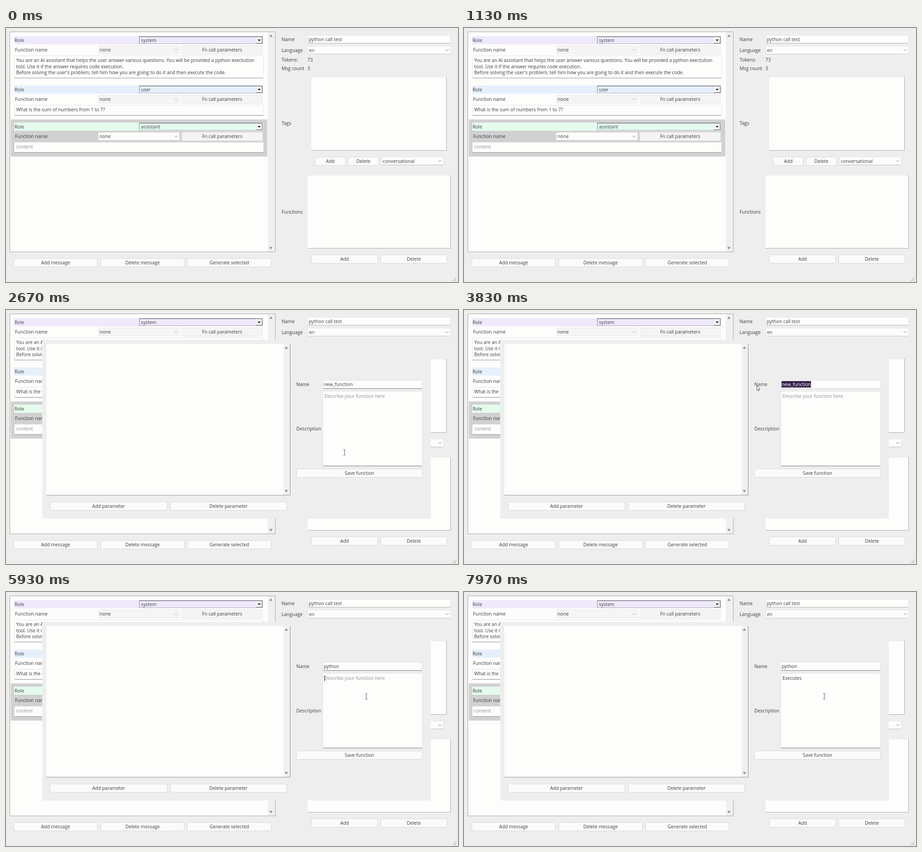
Write an HTML page with a canvas that moves like this. It is 998 px wide and 561 px high and loops after 8000 ms.

```html
<!DOCTYPE html>
<html lang="en">
<head>
<meta charset="utf-8">
<title>Function editor</title>
<style>
  html, body { margin: 0; width: 100%; height: 100%; overflow: hidden; background: #eeeeee; }
  canvas { display: block; }
</style>
</head>
<body>
<canvas id="stage" width="998" height="561"></canvas>
<script>
const ctx = document.getElementById('stage').getContext('2d');
const LOOP = 8000;
const FACE = '#eeeeee', PAPER = '#fdfdfc', INK = '#3c3c3c', HINT = '#8f8f8f';
const FONT = '10.32px "Open Sans", "Noto Sans", sans-serif';

function fill(x, y, w, h, color) {
  ctx.fillStyle = color;
  ctx.fillRect(x, y, w, h);
}

function rounded(x, y, w, h, color, border, radius = 2) {
  ctx.beginPath();
  ctx.roundRect(x + 0.5, y + 0.5, w - 1, h - 1, radius);
  ctx.fillStyle = color;
  ctx.fill();
  ctx.strokeStyle = border;
  ctx.lineWidth = 1;
  ctx.stroke();
}

function path(points, color, closed) {
  ctx.beginPath();
  points.forEach(([x, y]) => ctx.lineTo(x, y));
  if (closed) {
    ctx.closePath();
    ctx.fillStyle = color;
    ctx.fill();
  } else {
    ctx.strokeStyle = color;
    ctx.lineWidth = 1;
    ctx.stroke();
  }
}

// The given y is the middle of the capital letters.
function text(value, x, y, color = INK, align = 'left') {
  ctx.textAlign = align;
  ctx.fillStyle = color;
  ctx.fillText(value, x, y + 3.7);
}

function button(label, x, y, w, { hot = false, color = '#fbfbfb', border = '#d8d8d8' } = {}) {
  rounded(x, y, w, 19.5, hot ? '#d8e9f5' : color, hot ? '#4b8fc9' : border);
  if (!hot) fill(x + 2, y + 18.5, w - 4, 1, border);
  text(label, x + w / 2, y + 9.7, INK, 'center');
}

function edit(x, y, w, h, line = '#8c8c8c') {
  rounded(x, y, w, h, PAPER, '#e3e3e6');
  fill(x + 1, y + h - 1, w - 2, 1, line);
}

function chevron(x, y, color = '#777') {
  path([[x - 3.5, y - 1.5], [x, y + 2], [x + 3.5, y - 1.5]], color);
}

function combo(value, x, y, w, enabled = true, line = '#c8c8d4') {
  rounded(x, y, w, 18.5, enabled ? PAPER : '#f5f5f5', '#e6e6e6');
  if (enabled) fill(x + 1, y + 17.5, w - 2, 1, line);
  text(value, x + 3, y + 9.5);
  chevron(x + w - 8, y + 9, enabled ? '#777' : '#b4b4b4');
}

function scrollArrow(x, y, dir) {
  path([[x - 3.5, y + 2.5 * dir], [x + 3.5, y + 2.5 * dir], [x, y - 3 * dir]], '#909090', true);
}

function list(x, y, w, h) {
  fill(x, y, w, h, PAPER);
  fill(x, y, w, 1, '#e4e4e0');
  fill(x + w - 1, y, 1, h, '#a9a9ad');
  fill(x, y + h - 1, w, 1, '#a9a9ad');
}

// Classic sunken drop-down: dark top and left, light bottom and right.
function roleCombo(role, y) {
  fill(294, y - 9, 273, 1, '#a2a2aa');
  fill(294, y - 8, 273, 1, '#85858d');
  fill(294, y - 9, 1, 17, '#85858d');
  fill(295, y + 7, 272, 1, '#b4b4bc');
  fill(566, y - 8, 1, 16, '#b4b4bc');
  fill(552, y - 7, 13, 13, '#f5f5f5');
  fill(565, y - 7, 1, 14, '#777');
  fill(552, y + 6, 14, 1, '#777');
  path([[555.5, y - 1.5], [562.5, y - 1.5], [559, y + 2]], '#111', true);
  text(role, 298, y + 0.5);
}

function message(y, role, tint, lines, height, selected) {
  if (selected) {
    ctx.beginPath();
    ctx.roundRect(10.5, y - 16, 566.5, 82, 2);
    ctx.fillStyle = '#d1d1d1';
    ctx.fill();
  }
  fill(18, y - 9, 550, 18, tint);
  text('Role', 19, y);
  roleCombo(role, y);
  text('Function name', 20, y + 21.5);
  combo('none', 203.5, y + 12.2, 180, selected);
  button('Fn call parameters', 387.5, y + 11.7, 179.5, { color: '#f4f4f4', border: '#e6e6e6' });
  edit(18, y + 34, 551, height);
  lines.forEach((line, i) => text(line, 22.5, y + 44.5 + i * 13.6, selected ? HINT : INK));
}

function mainWindow(hot) {
  fill(0, 0, 998, 561, FACE);
  fill(8, 8, 587, 487, '#a6a6a2');
  fill(9, 9, 585, 485, PAPER);
  fill(578, 9, 16, 485, '#f0f0f0');
  scrollArrow(585, 17, 1);
  scrollArrow(585, 486, -1);
  message(27, 'system', '#efe9fb', [
    'You are an AI assistant that helps the user answer various questions. You will be provided a python exectution',
    'tool. Use it if the answer requires code execution.',
    "Before solving the user's problem, tell him how you are going to do it and then execute the code."
  ], 50, false);
  message(136, 'user', '#e6f0fc', ['What is the sum of numbers from 1 to 7?'], 23.5, false);
  message(218, 'assistant', '#e5fbee', ['content'], 23.5, true);
  button('Add message', 17, 508.5, 185);
  button('Delete message', 209, 508.5, 185);
  button('Generate selected', 400, 508.5, 186);

  text('Name', 608.5, 25);
  edit(666, 15.5, 316, 18.5, '#b0b0a8');
  text('python call test', 668.5, 25);
  text('Language', 608.5, 49);
  combo('en', 666, 39.5, 316);
  text('Tokens:', 608.5, 70.5);
  text('73', 665.5, 70.5);
  text('Msg count', 608.5, 89);
  text('3', 665.5, 89);
  text('Tags', 608.5, 210.5);
  list(674, 107.5, 299, 163.5);
  button('Add', 682.5, 284.5, 67);
  button('Delete', 755.5, 284.5, 67);
  combo('conversational', 829, 284.5, 137, true, '#b4b4cc');
  text('Functions', 608.5, 406.5);
  list(666, 324.5, 316, 162.5);
  button('Add', 674, 500.5, 147, { hot });
  button('Delete', 827, 500.5, 147);
  for (let row = 0; row < 3; row++)
    for (let col = 2 - row; col < 3; col++)
      fill(986 + col * 3, 551 + row * 3, 2, 2, '#bdbdbd');
}

function caret(x, y) {
  fill(Math.round(x), y - 6, 1, 13, '#222');
}

function typed(word, start, end, t) {
  const count = Math.floor((t - start) / (end - start) * word.length) + 1;
  return word.slice(0, Math.max(0, count));
}

function dialog(t) {
  fill(80, 66, 858, 394.5, FACE);
  fill(89, 75, 539, 334.5, PAPER);
  fill(613, 75, 14, 334, '#f0f0f0');
  fill(627, 75, 1, 334, '#8e8e8e');
  fill(89, 408.5, 539, 1, '#8e8e8e');
  scrollArrow(619, 83, 1);
  scrollArrow(619, 400, -1);
  button('Add parameter', 97, 423.5, 259);
  button('Delete parameter', 362.5, 423.5, 257.5);

  const nameFocus = t >= 3400 && t < 5650;
  const name = t < 4300 ? 'new_function' : typed('python', 4300, 5000, t);
  text('Name', 641, 164.5);
  edit(699, 155, 221, 19, nameFocus ? '#d9d9d9' : '#777');
  text(name, 701.5, 164.5);
  if (t >= 3440 && t < 4300) {
    const full = ctx.measureText(name).width;
    const width = full * Math.min(1, (t - 3440) / 180);
    ctx.save();
    ctx.beginPath();
    ctx.rect(701 + full - width, 157, width + 1, 14.5);
    ctx.clip();
    fill(701, 157, full + 1, 14.5, '#35204a');
    text(name, 701.5, 164.5, '#fff');
    ctx.restore();
  } else if (t >= 4300 && nameFocus) {
    caret(702 + ctx.measureText(name).width, 164);
  }

  const description = typed('Executes ', 6400, 7820, t);
  text('Description', 641, 262);
  edit(699, 179, 221, 166, '#777');
  text(description || 'Describe your function here', 703, 190, description ? INK : HINT);
  if (t >= 5650 && t < 7900) caret(703 + ctx.measureText(description).width, 190);
  button('Save function', 641, 350.5, 279);
}

// Each move: start time, end time, destination.
const MOVES = [
  [1330, 1600, 761, 513],
  [2540, 2650, 747, 314],
  [2850, 3250, 766, 165],
  [3430, 3640, 646, 167],
  [5080, 5480, 795, 230]
];

function pointerAt(t) {
  let x = 905, y = 425;
  for (const [start, end, toX, toY] of MOVES) {
    const p = Math.min(1, Math.max(0, (t - start) / (end - start)));
    const ease = p * p * (3 - 2 * p);
    x += (toX - x) * ease;
    y += (toY - y) * ease;
  }
  return [x, y];
}

function pointer(t) {
  const [x, y] = pointerAt(t);
  const inside = (top, bottom) => x > 699 && x < 920 && y > top && y < bottom;
  ctx.save();
  ctx.translate(Math.round(x), Math.round(y));
  if (t >= 1760 && (inside(155, 174) || inside(179, 345))) {
    fill(0, -5, 1, 11, '#555');
    fill(-2, -6, 2, 1, '#555');
    fill(1, -6, 2, 1, '#555');
    fill(-2, 6, 2, 1, '#555');
    fill(1, 6, 2, 1, '#555');
  } else {
    const arrow = [[0.5, 0.5], [0.5, 10.5], [2.8, 8.5], [4.4, 12], [6, 11.2], [4.5, 7.8], [7.5, 7.5], [0.5, 0.5]];
    path(arrow, '#fff', true);
    path(arrow, '#555');
  }
  ctx.restore();
}

function draw(now) {
  const t = now % LOOP;
  ctx.font = FONT;
  mainWindow(t >= 1540 && t < 2570);
  if (t >= 1760) dialog(t);
  if (t >= 1330) pointer(t);
  requestAnimationFrame(draw);
}
requestAnimationFrame(draw);
</script>
</body>
</html>
```
